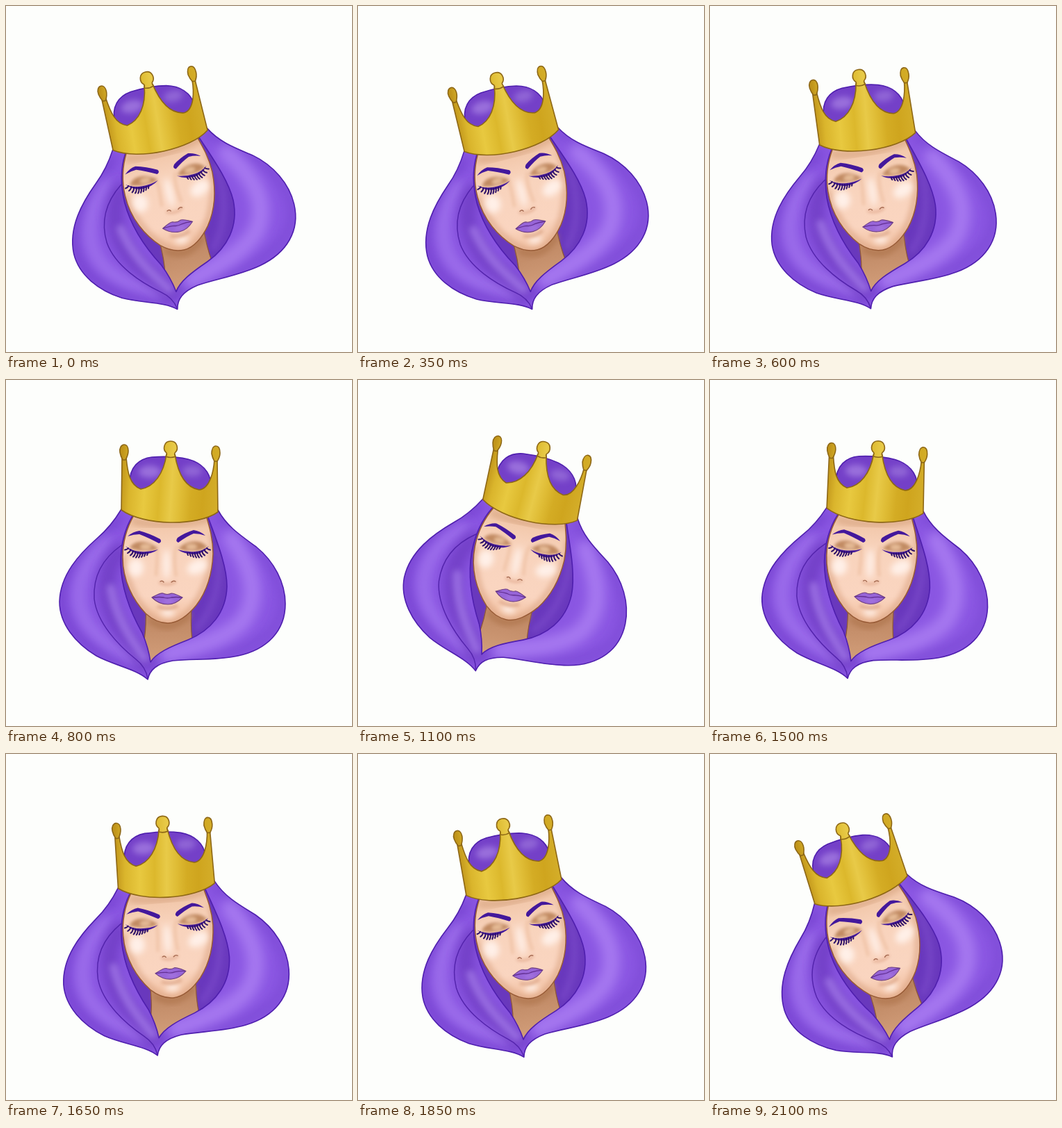
These frames come from a looping animation (498 by 498 pixels, 2150 ms). An HTML page:

```html
<!DOCTYPE html>
<html lang="en">
<head>
<meta charset="utf-8">
<title>Swaying queen</title>
<style>
  html, body { margin: 0; width: 100%; height: 100%; overflow: hidden; background: #fdfefc; }
  svg { display: block; width: 100vw; height: 100vh; }
  .line { fill: none; stroke-linecap: round; stroke-linejoin: round; }
  .hair { stroke: #4f1fae; stroke-width: 1.6; stroke-linejoin: round; }
  .gold { fill: url(#gold); stroke: #8d6716; stroke-width: 1.6; stroke-linejoin: round; }
  .soft { filter: url(#blur8); }
  .mid { filter: url(#blur4); }
  .fine { filter: url(#blur2); }
  .ink { fill: #43189c; }
</style>
</head>
<body>
<svg viewBox="0 0 498 498">
  <defs>
    <linearGradient id="gold" gradientUnits="userSpaceOnUse" x1="164" y1="150" x2="307" y2="160">
      <stop offset="0" stop-color="#c0941a"/>
      <stop offset=".1" stop-color="#dab52c"/>
      <stop offset=".25" stop-color="#e8c940"/>
      <stop offset=".4" stop-color="#dcb82c"/>
      <stop offset=".52" stop-color="#e8ca48"/>
      <stop offset=".62" stop-color="#dfbc35"/>
      <stop offset=".72" stop-color="#d4ac24"/>
      <stop offset=".84" stop-color="#cfa51e"/>
      <stop offset="1" stop-color="#d4ae2a"/>
    </linearGradient>
    <linearGradient id="skin" x1="0" y1="0" x2="0" y2="1">
      <stop offset="0" stop-color="#efc2a2"/>
      <stop offset=".3" stop-color="#f8d3bc"/>
      <stop offset=".75" stop-color="#fad5c0"/>
      <stop offset="1" stop-color="#f0be9e"/>
    </linearGradient>
    <linearGradient id="neck" x1="0" y1="0" x2="0" y2="1">
      <stop offset="0" stop-color="#bd8561"/>
      <stop offset=".45" stop-color="#c58f6b"/>
      <stop offset="1" stop-color="#d4a07c"/>
    </linearGradient>
    <filter id="blur8" x="-50%" y="-50%" width="200%" height="200%"><feGaussianBlur stdDeviation="8"/></filter>
    <filter id="blur4" x="-50%" y="-50%" width="200%" height="200%"><feGaussianBlur stdDeviation="4"/></filter>
    <filter id="blur2" x="-50%" y="-50%" width="200%" height="200%"><feGaussianBlur stdDeviation="2"/></filter>

    <path id="mane" d="M166 186C154 206 144 217 131 228C106 250 78 280 77 319C77 351 100 379 130 397C156 411 188 416 204 431C207 417 217 408 240 404C270 401 301 404 334 397C376 388 402 361 402 322C402 292 386 261 360 240C338 224 318 211 305 187Z"/>
    <path id="opening" d="M182 196C170 216 165 238 165 264C166 302 179 334 196 364C202 378 206 392 208 406C216 393 236 384 262 374C294 361 317 335 318 297C318 266 301 226 290 195Z"/>
    <path id="face" d="M184 195C172 216 168 235 168 255C168 289 183 317 201 336C212 346 222 350 233 350C247 350 262 339 274 324C289 304 297 277 298 250C298 229 293 212 288 195Z"/>
    <path id="dome" d="M178 150C177 125 192 113 210 111C225 110 245 110 262 114C281 119 294 132 295 150L270 175H200Z"/>
    <clipPath id="inMane"><use href="#mane"/></clipPath>
    <clipPath id="inOpening"><use href="#opening"/></clipPath>
    <clipPath id="inFace"><use href="#face"/></clipPath>
    <clipPath id="inDome"><use href="#dome"/></clipPath>
  </defs>

  <g id="head">
    <!-- top of the hair -->
    <use href="#dome" class="hair" fill="#7440c8"/>
    <g clip-path="url(#inDome)">
      <ellipse class="mid" cx="207" cy="132" rx="16" ry="9" fill="#9a70dc"/>
      <ellipse class="mid" cx="268" cy="131" rx="14" ry="8" fill="#9065d6"/>
    </g>

    <!-- long hair -->
    <use href="#mane" fill="#8a56e2"/>
    <g clip-path="url(#inMane)" class="line">
      <path class="soft" d="M304 192C345 231 397 258 399 322C394 380 340 397 205 409" stroke="#7b48d4" stroke-width="11"/>
      <path class="soft" d="M163 199C110 239 77 276 81 321C91 374 137 398 193 415" stroke="#7642d0" stroke-width="13"/>
      <path class="soft" d="M324 228C354 270 367 312 340 348C314 374 274 383 234 395" stroke="#a678f0" stroke-width="25"/>
      <path class="soft" d="M146 232C104 270 95 313 116 349C132 371 157 388 184 401" stroke="#9f71ec" stroke-width="16"/>
      <path class="soft" d="M163 247C139 277 142 314 158 346C170 368 189 386 200 404" stroke="#7340c8" stroke-width="26"/>
      <path class="mid" d="M151 300C158 341 178 370 199 400" stroke="#966ae0" stroke-width="13"/>
      <path d="M166 238C139 257 125 282 127 315C131 350 162 382 187 402C196 409 202 417 204 430" stroke="#5424ad" stroke-width="1.5"/>
    </g>
    <use href="#mane" class="hair" fill="none"/>

    <!-- hair behind the face, then the neck -->
    <use href="#opening" fill="#6938bd"/>
    <g clip-path="url(#inOpening)">
      <path class="mid" d="M304 240C312 280 302 329 273 359" fill="none" stroke="#7644c6" stroke-width="9"/>
      <path d="M201 325C202 348 201 364 198 379L209 410L236 390L268 374C266 358 266 345 267 325Z" fill="url(#neck)" stroke="#8c5639" stroke-width="1.3"/>
      <path class="mid" d="M206 344Q234 367 264 337" fill="none" stroke="#b07750" stroke-width="8"/>
    </g>
    <use href="#opening" class="hair" fill="none"/>

    <!-- face -->
    <use href="#face" fill="url(#skin)"/>
    <g clip-path="url(#inFace)">
      <path class="mid" d="M181 203Q235 215 294 199" fill="none" stroke="#dcaa88" stroke-width="8"/>
      <path class="mid" d="M298 220C301 280 275 338 236 351C203 350 174 303 168 253" fill="none" stroke="#dba483" stroke-width="6"/>
      <g class="mid" fill="#fff0e8">
        <ellipse cx="187" cy="270" rx="11" ry="13"/>
        <ellipse cx="275" cy="269" rx="15" ry="10" transform="rotate(-25 275 269)"/>
        <ellipse cx="231" cy="265" rx="5" ry="21"/>
        <ellipse cx="233" cy="335" rx="10" ry="5"/>
      </g>
      <g class="fine">
        <path d="M216 238C220 252 216 268 216 282M246 238C241 250 243 270 245 283" fill="none" stroke="#f0c4a8" stroke-width="4"/>
        <path d="M178 242C183 230 204 229 219 243Q202 250 178 242ZM248 243C259 230 282 228 290 241Q271 251 248 243Z" fill="#c18a62"/>
        <ellipse cx="201" cy="240" rx="8" ry="4" fill="#e6bb96"/>
        <ellipse cx="267" cy="240" rx="8" ry="4" fill="#e6bb96"/>
        <path d="M220 291Q232 298 245 290" fill="none" stroke="#e2ab90" stroke-width="3"/>
        <path d="M218 326Q233 332 247 325" fill="none" stroke="#dfa98b" stroke-width="4"/>
      </g>
    </g>
    <use href="#face" fill="none" stroke="#985b36" stroke-width="1.5"/>
    <path class="line" d="M222 290Q225 288 227 291M238 291Q241 288 244 290" stroke="#a56a50" stroke-width="1.4"/>

    <!-- brows and lashes -->
    <path class="ink" d="M175 225Q183 218 192 217Q207 221 222 229Q225 233 220 235Q205 227 192 222Q184 222 175 225Z"/>
    <path class="ink" d="M287 224Q279 217 270 216Q257 220 247 227Q243 232 248 234Q260 225 270 221Q279 221 287 224Z"/>
    <path class="ink" d="M172 239Q181 246 194 247Q207 248 219 244Q209 251 194 251Q180 249 172 239Z"/>
    <path class="ink" d="M292 239Q284 246 272 247Q259 248 247 244Q257 251 272 251Q285 249 292 239Z"/>
    <path id="lashes" class="line" stroke="#2f1268" stroke-width="2"/>

    <!-- mouth -->
    <path d="M210 313C216 310 222 306 226 307Q232 310 238 307C243 307 248 310 254 313C247 320 241 323 233 323C224 323 217 320 210 313Z" fill="#9765d8" stroke="#71427f" stroke-width="1.1"/>
    <path class="line" d="M211 313Q222 312 227 313Q232 315 238 313Q245 312 253 313" stroke="#633092" stroke-width="1.3"/>
    <ellipse class="fine" cx="234" cy="318" rx="8" ry="1.8" fill="#a97be2"/>

    <!-- crown -->
    <path class="gold" d="M167 112L166 187C198 210 276 211 305 190L304 114H300C299 132 293 157 278 158C260 155 248 137 243 107H231C227 135 213 154 194 157C178 151 175 133 173 112Z"/>
    <path class="gold" d="M170 93C166 93 163 98 164 104Q165 110 168 115H172Q176 108 176 102C176 97 174 93 170 93Z"/>
    <path class="gold" d="M302 95C298 95 296 100 296 106Q297 112 300 117H304Q308 111 308 105C308 99 306 95 302 95Z"/>
    <path class="gold" d="M230 110Q232 107 231 105C225 100 227 88 237 88C247 88 249 100 243 105Q242 107 244 110Q237 113 230 110Z"/>
  </g>
</svg>
<script>
  const LOOP = 2150, STEP = 50;
  // Tilt in degrees at chosen times
  const sway = [[0, -13.2], [180, -15.8], [350, -14.4], [550, -10.3], [800, 0],
    [1100, 11.3], [1200, 12], [1300, 10.5], [1650, -4.4], [2100, -18]];
  const head = document.getElementById('head');

  function slope(i) {
    const a = sway[Math.max(i - 1, 0)], b = sway[Math.min(i + 1, sway.length - 1)];
    return (b[1] - a[1]) / (b[0] - a[0]);
  }

  // Smooth curve through the tilt points
  function tilt(t) {
    let i = 0;
    while (i < sway.length - 2 && t > sway[i + 1][0]) i++;
    const [t0, a] = sway[i], [t1, b] = sway[i + 1];
    const d = t1 - t0, u = (t - t0) / d, v = 1 - u;
    return a * v * v * (1 + 2 * u) + b * u * u * (3 - 2 * u)
      + d * u * v * (slope(i) * v - slope(i + 1) * u);
  }

  // Lashes fan out from the inner to the outer corner of each eye
  function lashes(inner, dir) {
    let d = '';
    for (let i = 0; i < 9; i++) {
      const k = i / 8, x = inner + dir * k * 28, y = 249 - 7 * k ** 3;
      const dx = dir * (1 + 4 * k), dy = 3 + 5 * Math.sin(k * 2.6) - 3 * k ** 3;
      d += `M${x} ${y}q${dx * .2} ${dy * .7} ${dx} ${dy}`;
    }
    return d;
  }
  document.getElementById('lashes').setAttribute('d', lashes(204, -1) + lashes(261, 1));

  function draw() {
    const t = Math.floor(performance.now() % LOOP / STEP) * STEP;
    head.setAttribute('transform', `rotate(${tilt(t).toFixed(2)} 249 249)`);
    requestAnimationFrame(draw);
  }
  draw();
</script>
</body>
</html>
```
